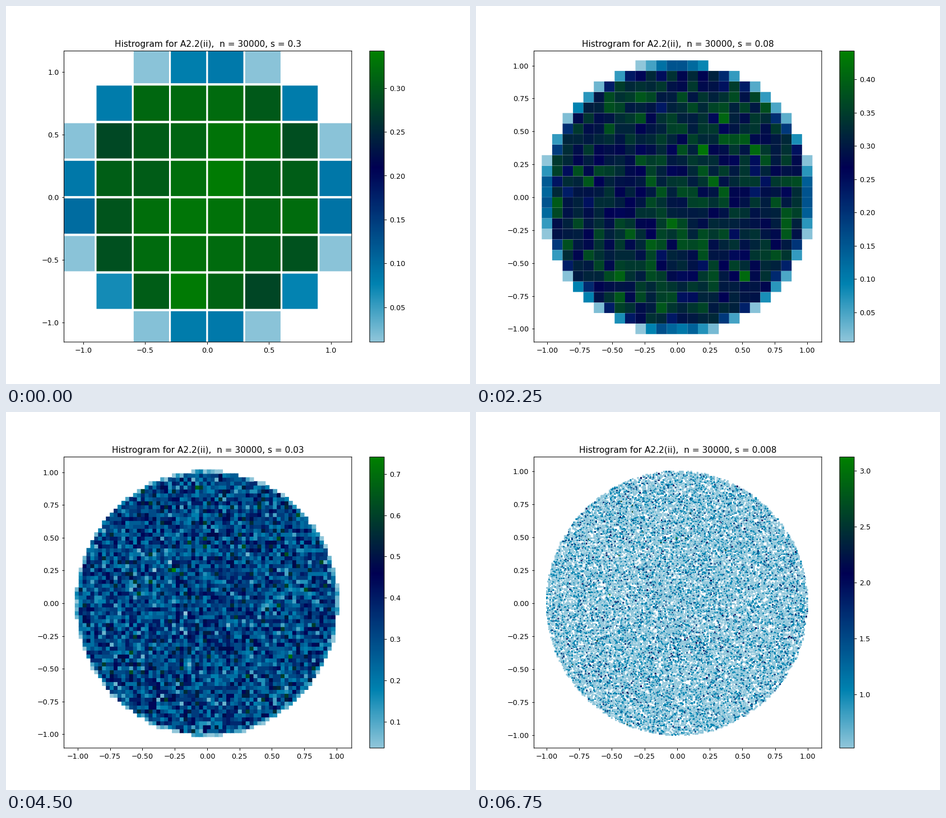
A matplotlib script for the animation above (7500 ms loop, 828x676 px).

```python
import math
import numpy as np
import matplotlib.pyplot as plt
from matplotlib.animation import FuncAnimation
from matplotlib.colors import LinearSegmentedColormap

W, H, DPI = 828, 676, 92
N = 30000

# cell size, fewest and most points in a cell (ends of the colour scale)
STEPS = [
    (0.3, 28, 924), (0.2, 104, 428), (0.1, 1, 122), (0.08, 1, 85), (0.05, 1, 40),
    (0.04, 1, 30), (0.03, 1, 20), (0.02, 1, 14), (0.01, 1, 7), (0.008, 1, 6),
]

CMAP = LinearSegmentedColormap.from_list(
    "sea", [(0, "#90c6da"), (0.2, "#0082b0"), (0.6, "#000052"), (1, "#008000")])


def disc_points():
    """Points spread evenly over the unit disc."""
    rng = np.random.default_rng(22)
    r = np.sqrt(rng.random(N))
    a = rng.random(N) * 2 * math.pi
    return r * np.cos(a), r * np.sin(a)


PX, PY = disc_points()


def histogram(s, half):
    """Centres and densities of the cells that hold points."""
    edges = np.arange(-half, half + 1) * s
    counts = np.histogram2d(PY, PX, bins=[edges, edges])[0]
    row, col = np.nonzero(counts)
    x, y = (col + 0.5 - half) * s, (row + 0.5 - half) * s
    return x, y, counts[row, col] / (N * s * s)


def draw(i):
    s, fewest, most = STEPS[i]
    half = math.ceil(1 / s - 1e-9)
    edge = (half - 0.5) * s
    low, high = -1.1 * edge, 1.1112 * edge
    x, y, dens = histogram(s, half)

    fig.clear()
    fig.subplots_adjust(bottom=0.11 + 0.7 / H, top=0.88 + 0.7 / H)
    ax = fig.add_subplot()
    pitch = 0.62 * W * s / (high - low)
    side = 0.93 * pitch + 1.4
    unit = N * s * s
    dots = ax.scatter(x, y, c=dens, s=(side * 72 / DPI) ** 2, marker="s", cmap=CMAP,
                      vmin=fewest / unit, vmax=most / unit, linewidths=0)
    fig.colorbar(dots, ax=ax)
    ax.set_xlim(low, high)
    ax.set_ylim(low, high)
    ax.set_title(f"Histrogram for A2.2(ii),  n = {N}, s = {s}")
    return []


plt.rcParams.update({"font.family": "DejaVu Sans", "path.snap": False})
fig = plt.figure(figsize=((W + 0.001) / DPI, (H + 0.001) / DPI), dpi=DPI)
anim = FuncAnimation(fig, draw, frames=len(STEPS), init_func=lambda: draw(0),
                     interval=750, repeat=True, repeat_delay=0, blit=False)
plt.show()
```
